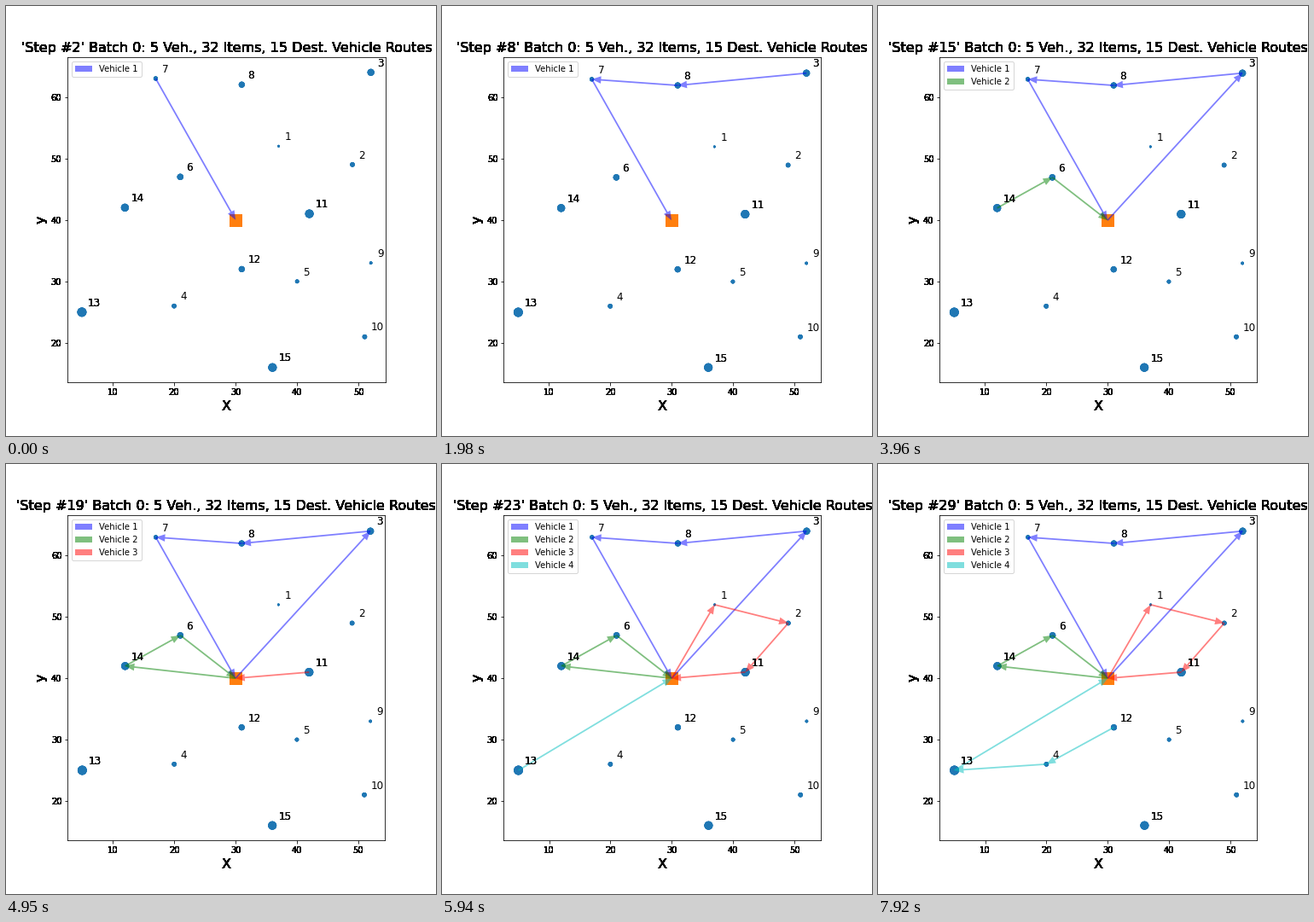
Write a matplotlib script that moves like this. It is 504 px wide and 504 px high and loops after 8000 ms.

```python
import matplotlib.pyplot as plt
import numpy as np
from matplotlib.animation import FuncAnimation

INTERVAL, LOOP, HOLD = 40, 8000, 330

# x, y and load of each destination, numbered from 1
STOPS = np.array([
    (37, 52, 1), (49, 49, 6), (52, 64, 15), (20, 26, 6), (40, 30, 4),
    (21, 47, 12), (17, 63, 5), (31, 62, 11), (52, 33, 2), (51, 21, 6),
    (42, 41, 24), (31, 32, 11), (5, 25, 29), (12, 42, 20), (36, 16, 24),
], float)
DEPOT = np.array((30, 40), float)

# per vehicle: colour and items dropped at each stop; one item per step
ROUTES = [
    ("b", {7: 2, 8: 3, 3: 2}),
    ("g", {6: 3, 14: 3}),
    ("r", {11: 3, 2: 1, 1: 1}),
    ("c", {13: 3, 4: 1, 12: 3}),
]

plt.rcParams["font.family"] = "DejaVu Sans"
fig, ax = plt.subplots(figsize=(7, 7), dpi=72)
fig.subplots_adjust(left=0.125, right=0.9, bottom=0.125, top=0.88)
ax.set_aspect("equal", adjustable="box")


def overprint(artist, passes):
    """Draw an artist several times so its soft edges darken."""
    base = artist.draw

    def draw(renderer):
        for _ in range(passes):
            base(renderer)

    artist.draw = draw


def add_leg(vehicle, start, end):
    return ax.arrow(*start, *(end - start), width=0.25, head_width=1.2,
                    head_length=1.5, length_includes_head=True, linewidth=0,
                    color=ROUTES[vehicle][0], alpha=0.5,
                    label=f"Vehicle {vehicle + 1}")


def plan_routes(step):
    """Return the step numbers shown and (first step, vehicle, arrow) legs."""
    steps, legs = [], []
    for vehicle, (_, drops) in enumerate(ROUTES):
        last = DEPOT
        for stop, items in drops.items():
            here = STOPS[stop - 1, :2]
            legs.append((step, vehicle, add_leg(vehicle, here, last)))
            steps += range(step, step + items)
            step += items
            last = here
        # closing the route takes a step that is never shown by itself
        legs.append((step, vehicle, add_leg(vehicle, DEPOT, last)))
        step += 1
    return steps, legs


dots = ax.scatter(STOPS[:, 0], STOPS[:, 1], s=3.3 * STOPS[:, 2], color="C0")
overprint(dots, 4)
for number, (x, y, load) in enumerate(STOPS, 1):
    label = ax.text(x + 1, y + 1, str(number), fontsize=12)
    overprint(label, 1 + int(load) // 8)
ax.scatter(*DEPOT, s=15 ** 2, marker="s", color="C1", linewidths=0)
steps, legs = plan_routes(2)

ax.set_xlabel("X", fontsize=16)
ax.set_ylabel("y", fontsize=16)
ax.set_xticks(range(10, 60, 10))
ax.set_yticks(range(20, 70, 10))
for axis in (ax.xaxis, ax.yaxis):
    overprint(axis.label, 16)
    for tick in axis.get_major_ticks():
        overprint(tick.label1, 16)
overprint(ax.title, 16)


def fit_view(arrows):
    """Fit the limits to the stops and the outlines of the shown arrows."""
    pts = np.vstack([STOPS[:, :2]] + [arrow.get_xy() for arrow in arrows])
    lo, hi = pts.min(axis=0), pts.max(axis=0)
    pad = 0.05 * (hi - lo)
    ax.set_xlim(lo[0] - pad[0], hi[0] + pad[0])
    ax.set_ylim(lo[1] - pad[1], hi[1] + pad[1])


def update(frame):
    step = steps[((frame + 1) * INTERVAL - 1) // HOLD]
    shown, handles = [], {}
    for start, vehicle, arrow in legs:
        arrow.set_visible(start <= step)
        if start <= step:
            shown.append(arrow)
            handles.setdefault(vehicle, arrow)
    fit_view(shown)
    ax.legend(handles=list(handles.values()), loc="upper left", fontsize=10)
    ax.set_title(f"'Step #{step}' Batch 0: 5 Veh., 32 Items, 15 Dest. "
                 "Vehicle Routes", fontsize=16)
    return []


anim = FuncAnimation(fig, update, frames=LOOP // INTERVAL, interval=INTERVAL,
                     init_func=lambda: update(0), repeat=True, repeat_delay=0)
plt.show()
```
